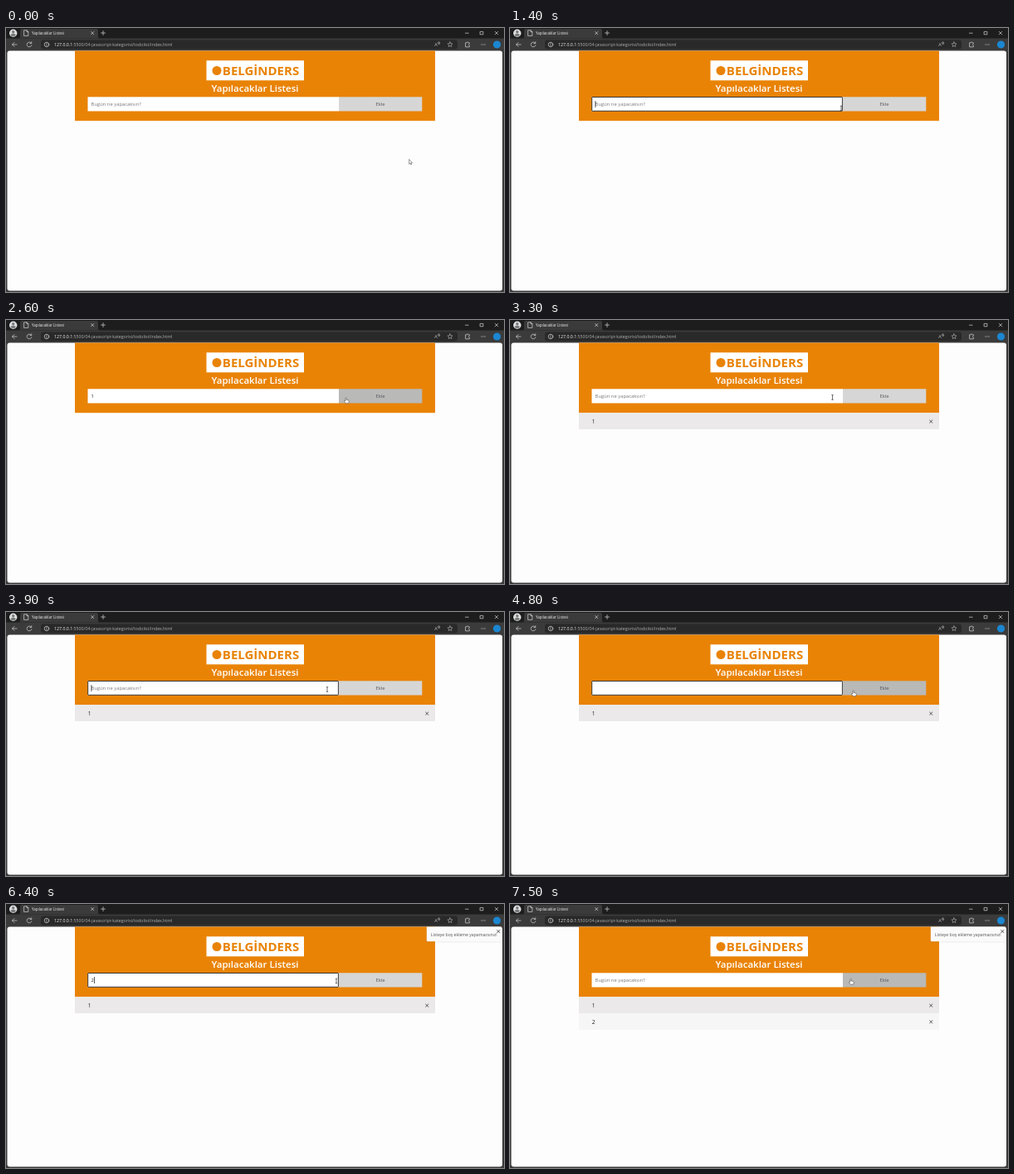
An HTML page that plays this animation: 600 by 319 pixels, repeating every 8 s.

```html
<!DOCTYPE html>
<html lang="tr">
<head>
<meta charset="utf-8">
<title>Yapılacaklar Listesi</title>
<style>
  html, body { margin: 0; width: 100%; height: 100%; overflow: hidden; background: #1d1d1d; }
  svg { display: block; width: 600px; height: 319px; }
  text { font-family: "Open Sans", "Noto Sans", sans-serif; white-space: pre; }
  .line { fill: none; stroke: #d6d6d6; stroke-width: .7; stroke-linecap: round; stroke-linejoin: round; }
  .field { font-size: 5.85px; }
  .cross { fill: none; stroke: #333; stroke-width: .8; }
  .item text { font-size: 6.6px; fill: #222; }
</style>
</head>
<body>
<svg viewBox="0 0 600 319">
  <!-- tab strip -->
  <rect width="600" height="319" fill="#3b3b3b"/>
  <rect width="600" height="12.5" fill="#1d1d1d"/>
  <path d="M15 12.5q2 0 2-2V3q0-2 2-2h90q2 0 2 2v7.500q0 2 2 2z" fill="#3b3b3b"/>
  <circle cx="8.700" cy="6.200" r="4.700" fill="#dedede"/>
  <circle cx="8.700" cy="4.700" r="1.700" fill="#77797b"/>
  <path d="M5.700 9q0-2.200 3-2.200t3 2.200q-3 2.400-6 0z" fill="#77797b"/>
  <path class="line" d="M22 2.800h3l1.800 1.800v4.800H22zM25 2.800v1.800h1.800"/>
  <text x="31" y="7.800" font-size="4.500" fill="#f0f0f0">Yapılacaklar Listesi</text>
  <path class="line" d="M102.600 4.500l3.200 3.200m0-3.200l-3.200 3.200M114.500 6h5m-2.500-2.500v5"/>
  <path class="line" d="M553.500 6.200h3.600M571.500 4.400h3.400v3.400h-3.400zM589.200 4.300l3.600 3.600m0-3.600l-3.600 3.600"/>

  <!-- toolbar -->
  <rect x="42" y="14.500" width="502" height="11" rx="3" fill="#292929"/>
  <path class="line" d="M13 20H7.500m2.500-2.500L7.500 20l2.500 2.500"/>
  <path class="line" d="M30.500 18.300a2.900 2.900 0 1 0 .4 2.500M30.800 16.700v1.900h-1.900"/>
  <circle class="line" cx="49" cy="20" r="2.800"/>
  <path class="line" d="M49 19.800v1.500M49 18.500v.1"/>
  <text x="58" y="21.900" font-size="5.250" fill="#b0b0b0"><tspan fill="#f4f4f4">127.0.0.1</tspan>:5500/04-javascript-kategorisi/todolist/index.html</text>
  <text x="516.300" y="22" font-size="5.500" fill="#bdbdbd">A</text>
  <path class="line" d="M520.700 17.400q.8.600 0 1.600m1.200-2.400q1.600 1.600 0 3.200" stroke-width=".5"/>
  <path class="line" id="star" style="stroke:#aaa"/>
  <path class="line" d="M554 17.800h1.300q.8-2.200 1.700 0h1.300v1.500q-2 .8 0 1.700v1.900H554z"/>
  <path class="line" d="M573 20h.1M575 20h.1M577 20h.1" style="stroke-width:1"/>
  <circle cx="591.500" cy="20" r="4.600" fill="#1c86d1"/>

  <!-- page -->
  <rect x="1.500" y="27.500" width="596.500" height="290" rx="3" fill="#fefdfe"/>
  <rect x="83" y="27.500" width="434" height="84.700" fill="#e98306"/>
  <rect x="241.500" y="39.300" width="117.500" height="24" fill="#fff"/>
  <circle cx="254" cy="51.500" r="5.500" fill="#e98306"/>
  <text x="307" y="57" text-anchor="middle" font-size="15" font-weight="700" fill="#e98306">BELGİNDERS</text>
  <text x="300" y="77.300" text-anchor="middle" font-size="11.500" font-weight="600" fill="#fff">Yapılacaklar Listesi</text>
  <rect x="98.500" y="83.300" width="302.500" height="17.200" fill="#fff"/>
  <rect id="button" x="401" y="83.300" width="100.300" height="17.200"/>
  <text class="field" x="451" y="94.300" text-anchor="middle" fill="#53565a">Ekle</text>
  <rect id="outline" x="98.700" y="83.500" width="301.700" height="16.800" rx=".5" fill="none" stroke="#222" stroke-width=".9"/>
  <text id="value" class="field" x="102.600" y="94.300"></text>
  <path id="caret" d="M0 88v8" stroke="#111" stroke-width=".7"/>

  <g class="item" id="item1">
    <rect x="83" y="112.200" width="434" height="19.800" fill="#ebe9ea"/>
    <text x="98.800" y="124.800">1</text>
    <path class="cross" d="M505.400 120.800l3.600 3.600m0-3.600l-3.600 3.600"/>
  </g>
  <g class="item" id="item2">
    <rect x="83" y="132" width="434" height="20" fill="#f7f6f7"/>
    <text x="98.800" y="144.600">2</text>
    <path class="cross" d="M505.400 140.600l3.600 3.600m0-3.600l-3.600 3.600"/>
  </g>

  <g id="toast">
    <rect x="506" y="28" width="92" height="18.500" rx="1.500" fill="#000" opacity=".06"/>
    <rect x="506.800" y="27.500" width="90.400" height="17.700" rx="1" fill="#fbfafb"/>
    <text x="511.800" y="38.800" font-size="5.130" fill="#555">Listeye boş ekleme yapamazsınız!</text>
    <path class="cross" d="M591.400 31.200l3.800 3.800m0-3.800l-3.800 3.800"/>
  </g>

  <g id="pointer">
    <path id="arrow" d="M-1.300-3.300v5.700l1.300-1.200.9 2 .8-.4-.9-1.900h1.700z" fill="#fff" stroke="#333" stroke-width=".5"/>
    <path id="beam" d="M-1.200-2.800h2.400M0-2.800v5.600M-1.200 2.800h2.400" fill="none" stroke="#333" stroke-width=".7"/>
    <path id="hand" d="M-1.500.7v-3.600q.6-1 1.200 0v2.300l2.300.6q.9.300.8 1.200l-.6 2.500h-3.300l-2-2.600q.2-1.200 1.600-.4z" fill="#fff" stroke="#333" stroke-width=".5" stroke-linejoin="round"/>
  </g>
</svg>
<script>
const LOOP = 8000;
const HINT = "Bugün ne yapacaksın?";
const $ = id => document.getElementById(id);

// Pointer stops: time, x, y. The pointer jumps from stop to stop.
const path = [
  [0, 487, 162], [100, 452, 96], [400, 437, 97], [500, 418, 97], [600, 397, 95], [900, 399, 97],
  [2000, 400, 96], [2100, 405, 97], [2200, 408, 97], [2300, 410.5, 97],
  [3100, 406, 95], [3200, 395, 94], [3300, 388.5, 93.5], [3400, 387, 93.5],
  [4500, 392, 95], [4600, 400, 96], [4700, 409, 97], [4800, 414.5, 98],
  [5400, 409, 96], [5500, 400, 94], [5600, 398, 93],
  [6700, 399, 93], [6800, 403, 93], [6900, 407, 93], [7000, 410, 93], [7200, 411.5, 93.5]
];

// Page changes; each adds to the ones before it.
const changes = [
  [0, { text: "", focus: 0, caret: 0, items: 0, toast: 0 }],
  [1100, { focus: 1, caret: 1 }],
  [1600, { text: "1" }],
  [2200, { caret: 0 }],
  [2600, { focus: 0 }],
  [2800, { text: "", items: 1 }],
  [3800, { focus: 1 }],
  [3900, { caret: 1 }],
  [4400, { text: " " }],
  [4700, { caret: 0 }],
  [4900, { focus: 0 }],
  [5000, { text: "", toast: .5 }],
  [5100, { toast: 1 }],
  [5700, { focus: 1, caret: 1 }],
  [6400, { text: "2" }],
  [6900, { caret: 0 }],
  [7400, { focus: 0 }],
  [7500, { text: "", items: 2 }]
];

const show = (id, on) => $(id).setAttribute("opacity", Number(on));

function drawStar() {
  const points = Array.from({ length: 10 }, (_, i) => {
    const r = i % 2 ? 1.5 : 3.2, a = i * Math.PI / 5 - Math.PI / 2;
    return `${535 + r * Math.cos(a)} ${20 + r * Math.sin(a)}`;
  });
  $("star").setAttribute("d", `M${points.join("L")}z`);
}

function render(t) {
  const past = step => step[0] <= t;
  const state = Object.assign({}, ...changes.filter(past).map(step => step[1]));
  const [, x, y] = path.filter(past).pop();
  const inRow = y > 83 && y < 100.5;
  const hover = inRow && x > 401;
  const kind = hover ? "hand" : inRow ? "beam" : "arrow";

  for (const id of ["arrow", "beam", "hand"]) show(id, id === kind);
  $("pointer").setAttribute("transform", `translate(${x} ${y})`);
  $("button").setAttribute("fill", hover ? "#b9b9b8" : "#d7d6d6");
  $("value").textContent = state.text || HINT;
  $("value").setAttribute("fill", state.text ? "#222" : "#777");
  show("outline", state.focus);
  show("caret", state.caret);
  const caretX = 102.9 + (state.text === " " ? 1.5 : state.text ? 3.6 : 0);
  $("caret").setAttribute("transform", `translate(${caretX} 0)`);
  show("item1", state.items > 0);
  show("item2", state.items > 1);
  show("toast", state.toast);
}

drawStar();
const start = performance.now();
function tick() {
  render((performance.now() - start) % LOOP);
  requestAnimationFrame(tick);
}
tick();
</script>
</body>
</html>
```
